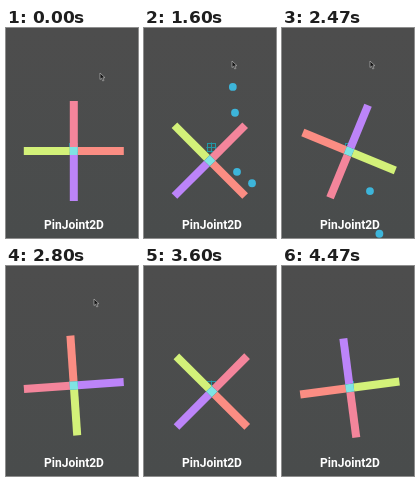
Animation of 132 by 210 pixels, one loop 4.53 s. Source, as an HTML page with a canvas:

```html
<!DOCTYPE html>
<html lang="en">
<head>
<meta charset="utf-8">
<title>PinJoint2D</title>
<style>
  html, body { margin: 0; width: 100%; height: 100%; overflow: hidden; background: #4c4c4c; }
  canvas { display: block; width: 132px; height: 210px; }
</style>
</head>
<body>
<canvas id="stage" width="132" height="210"></canvas>
<script>
const ctx = document.getElementById('stage').getContext('2d');
const LOOP = 4530, FPS = 15, LAST_STEP = 67;
const GRAVITY = 226, ARM = 50, HALF = 4;
const ARM_COLORS = ['#f4859b', '#fb8d83', '#bc84f9', '#d3f179'];
const PIN = { x: 67.5, y: 119.5 };
const HIT = 1.03, FREE = 2.133; // first ball lands, last ball leaves the arms

// lean: sideways drift while falling; bounce and push: motion after landing.
const balls = [
  { born: 0.24, x: 97, y: 44, lean: 0, land: HIT, bounce: 7, push: 34 },
  { born: 0.66, x: 96, y: 44, lean: -3.6, land: 1.6, bounce: 90, push: 80 },
  { born: 0.95, x: 91, y: 37, lean: 0, land: 1.667, bounce: 48, push: 10 },
  { born: 1.15, x: 90, y: 36, lean: -13, land: 2.067, bounce: 35, push: 50 }
];

function ramp(from, to, t) {
  const u = Math.min(Math.max((t - from) / (to - from), 0), 1);
  return u * u * (3 - 2 * u);
}

// The balls spin the cross up, then friction slows it evenly.
function crossAngle(t) {
  if (t < HIT) return 0;
  if (t < FREE) return 135 * ((t - HIT) / (FREE - HIT)) ** 1.664;
  const s = t - FREE;
  return 135 + 207 * s - 15.7 * s * s;
}

// The soft joint sags under the load and keeps swinging.
function crossCenter(t) {
  const active = ramp(HIT, 1.6, t);
  const load = active * (1 - ramp(FREE, 2.7, t));
  const swing = -3.5 * active * Math.cos(3 * (t - 2.8));
  return [67.8 - 2 * load, 123 + 6.5 * load + swing];
}

function drawPin() {
  ctx.save();
  ctx.strokeStyle = '#2297a5';
  ctx.lineWidth = 1;
  ctx.strokeRect(PIN.x - 4, PIN.y - 4, 8, 8);
  ctx.beginPath();
  ctx.moveTo(PIN.x - 5, PIN.y);
  ctx.lineTo(PIN.x + 5, PIN.y);
  ctx.moveTo(PIN.x, PIN.y - 5);
  ctx.lineTo(PIN.x, PIN.y + 5);
  ctx.stroke();
  ctx.restore();
}

function drawCross(t) {
  ctx.save();
  ctx.translate(...crossCenter(t));
  ctx.rotate(crossAngle(t) * Math.PI / 180);
  for (const color of ARM_COLORS) {
    ctx.fillStyle = color;
    ctx.fillRect(-HALF, -ARM, HALF * 2, ARM - HALF);
    ctx.rotate(Math.PI / 2);
  }
  ctx.fillStyle = '#7fe3e3';
  ctx.fillRect(-HALF, -HALF, HALF * 2, HALF * 2);
  ctx.restore();
}

function drawBall({ born, x, y, lean, land, bounce, push }, t) {
  if (t < born) return;
  const fall = Math.min(t, land) - born;
  const after = Math.max(t - land, 0);
  const drop = GRAVITY / 2 * (fall ** 2 + after ** 2) + bounce * after;
  ctx.fillStyle = '#3db5da';
  ctx.beginPath();
  ctx.arc(x + lean * fall ** 3 + push * after ** 2, y + drop, 3.9, 0, Math.PI * 2);
  ctx.fill();
}

function drawCursor(t) {
  if (t > 3.45) return;
  const aim = ramp(0.4, 0.9, t), leave = ramp(3.15, 3.5, t);
  ctx.save();
  ctx.translate(94 - 6 * aim + 2 * leave, 45 - 12 * aim - 27 * leave);
  ctx.beginPath();
  [[0, 0], [0, 6.5], [1.6, 5.2], [2.8, 8], [4, 7.4], [2.8, 4.8], [5, 4.7]]
    .forEach(p => ctx.lineTo(...p));
  ctx.closePath();
  ctx.fillStyle = '#151515';
  ctx.strokeStyle = '#b4b4b4';
  ctx.lineWidth = 0.7;
  ctx.fill();
  ctx.stroke();
  ctx.restore();
}

function drawLabel() {
  ctx.fillStyle = '#fff';
  ctx.font = 'bold 12px Roboto, sans-serif';
  ctx.textAlign = 'center';
  ctx.fillText('PinJoint2D', 68, 201);
}

function drawBackground() {
  const shade = ctx.createLinearGradient(0, 0, 0, 210);
  shade.addColorStop(0, '#4d4d4d');
  shade.addColorStop(1, '#494c4c');
  ctx.fillStyle = shade;
  ctx.fillRect(0, 0, 132, 210);
}

function render(now) {
  const step = Math.min(Math.floor((now % LOOP + 5) * FPS / 1000), LAST_STEP);
  const t = step / FPS;
  drawBackground();
  drawPin();
  drawCross(t);
  balls.forEach(ball => drawBall(ball, t));
  drawLabel();
  drawCursor(t);
}

const start = performance.now();
function tick() {
  render(performance.now() - start);
  requestAnimationFrame(tick);
}
tick();
</script>
</body>
</html>
```
